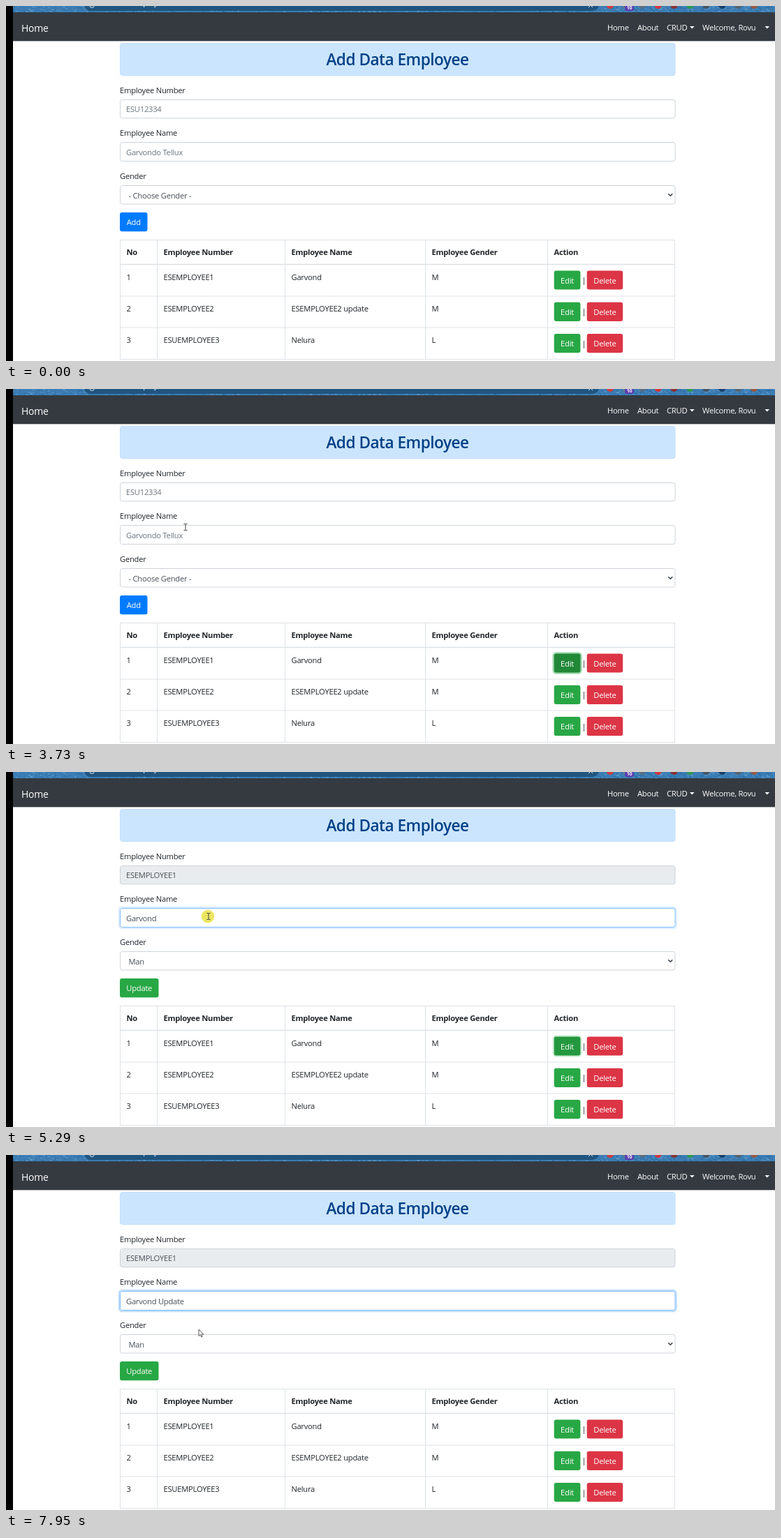
An HTML page that plays this animation: 1101x509 px, repeating every 8 s.

```html
<!DOCTYPE html>
<html lang="en">
<head>
<meta charset="utf-8">
<title>Add Data Employee</title>
<style>
  html, body { margin: 0; width: 100%; height: 100%; overflow: hidden; background: #fff; }
  svg { display: block; }
  text { font: 11.2px "Open Sans", "Noto Sans", sans-serif; letter-spacing: -.022em; fill: #212529; }
  .bold { font-weight: 700; }
  .white { fill: #fff; }
  .mid { text-anchor: middle; }
  .brand { font-size: 14px; }
  .title { font-size: 22.6px; font-weight: 600; fill: #004085; }
  .hint { font-size: 9px; font-weight: 600; fill: #fff; }
</style>
</head>
<body>
<svg id="stage" width="1101" height="509"></svg>
<script>
const LOOP = 8000;
const GREEN = '#28a745', BORDER = '#ced4da', LINE = '#dee2e6';
const NAME = 'Garvond', FULL_NAME = 'Garvondo Tellux';

let layer = document.getElementById('stage');

function add(tag, attrs, content = '') {
  const el = document.createElementNS('http://www.w3.org/2000/svg', tag);
  for (const key in attrs) el.setAttribute(key, attrs[key]);
  el.textContent = content;
  layer.append(el);
  return el;
}
const rect = (x, y, width, height, fill, more) => add('rect', { x, y, width, height, fill, ...more });
const text = (x, y, content, cls = '') => add('text', { x, y, class: cls }, content);
const path = (d, more) => add('path', { d, fill: 'none', ...more });
const box = (x, y, w, h, fill, stroke = BORDER) =>
  rect(x + .5, y + .5, w - 1, h - 1, fill, { rx: 3, stroke });
const ring = (x, y, w, h, stroke) =>
  rect(x - 1.1, y - 1.1, w + 2.2, h + 2.2, 'none', { rx: 4, stroke, 'stroke-width': 2.3 });

function group(draw) {
  const parent = layer, g = add('g', {});
  layer = g;
  draw();
  layer = parent;
  return g;
}
function button(x, y, w, label, fill) {
  rect(x, y, w, 27.2, fill, { rx: 3 });
  text(x + w / 2, y + 18.2, label, 'white mid');
}
const show = (el, on) => el.setAttribute('visibility', on ? 'visible' : 'hidden');
const fade = (el, amount) => el.setAttribute('opacity', amount);

// Browser strip with a denim theme
rect(10, 0, 1091, 9.5, '#3b7db4');
let seed = 7;
const random = () => (seed = seed * 16807 % 2147483647) / 2147483647;
for (const [color, count] of [['#1f5f97', 420], ['#7fb2d8', 380]]) {
  let d = '';
  for (let i = 0; i < count; i++)
    d += `M${(10 + random() * 1088).toFixed(1)},${(random() * 9).toFixed(1)}l${(1 + random() * 3).toFixed(1)},${(random() * 4 - 1).toFixed(1)}`;
  path(d, { stroke: color, 'stroke-width': .8, opacity: .75 });
}
rect(112, -12, 737, 19, '#205580', { rx: 9 });
text(180, -1, 'employee', 'white');
add('circle', { cx: 123, cy: -1, r: 3.4, fill: 'none', stroke: '#dce8f2' });
path('M834,2l3,-3l3,3', { stroke: '#dce8f2' });
['#d23c3c', '#6b7680', '#5a6d80', '#d8353c', '#8c3030', '#2e9a4c', '#47525c', '#17406a', '#58626c', '#9a5a40']
  .forEach((fill, i) => add('circle', { cx: 865 + i * 22.9, cy: -1, r: 5, fill }));
rect(886, -4, 13, 11, '#5b3fb0', { rx: 2 });
add('text', { x: 892.5, y: 5, class: 'white mid bold', style: 'font-size:7px' }, '10');

// Navigation bar
rect(10, 9, 1091, 41.3, '#343a40');
rect(0, 0, 10, 509, '#000');
text(22, 36.5, 'Home', 'white brand');
text(861, 35, 'Home', 'white');
text(904, 35, 'About', 'white');
text(946, 35, 'CRUD', 'white');
text(997, 35, 'Welcome, Rovu', 'white');
for (const x of [979, 1086.5]) path(`M${x},29h6.6l-3.3,3.4z`, { style: 'fill:#fff' });

// Form
box(163, 53, 795.5, 47, '#cce5ff', '#c0deff');
text(560.5, 85, 'Add Data Employee', 'title mid');
text(163, 124.5, 'Employee Number');
text(163, 186, 'Employee Name');
text(163, 248, 'Gender');
const numberBox = box(163, 134, 795.5, 27.3, '#fff');
const nameBox = box(163, 195, 795.5, 28, '#fff');
const nameRing = ring(163, 195, 795.5, 28, 'rgba(0,123,255,.25)');
box(163, 257, 795.5, 27.5, '#fff');
path('M948.2,269.2l3,3l3,-3', { stroke: '#343a40', 'stroke-width': 1.5 });
const numberText = text(172, 152.3, '');
const nameText = text(172, 214, '');
const genderText = text(175.5, 275.7, '');
const caret = rect(0, 203, 1, 13, '#333');
const addButton = group(() => button(163, 296, 39.5, 'Add', '#007bff'));
const updateButton = group(() => button(163, 296, 55.5, 'Update', GREEN));

// Table
const columns = [163.5, 216.5, 399.5, 600.5, 775.5, 957.5];
path(columns.map(x => `M${x},335V506.5`).join('') + 'M163,335.5H958M163,416H958M163,461H958M163,506.5H958', { stroke: LINE });
path('M163,370.5H958', { stroke: LINE, 'stroke-width': 1.6 });
['No', 'Employee Number', 'Employee Name', 'Employee Gender', 'Action']
  .forEach((head, i) => text(columns[i] + 9, 357, head, 'bold'));

let editHover, editRing;
[
  ['1', 'ESEMPLOYEE1', NAME, 'M'],
  ['2', 'ESEMPLOYEE2', 'ESEMPLOYEE2 update', 'M'],
  ['3', 'ESUEMPLOYEE3', 'Nelura', 'L']
].forEach((row, i) => {
  const y = 379.4 + i * 45.3;
  row.forEach((cell, c) => text(columns[c] + 9, y + 13.4, cell));
  button(784.7, y, 37.7, 'Edit', GREEN);
  if (!i) {
    editHover = group(() => button(784.7, y, 37.7, 'Edit', '#218838'));
    editRing = ring(784.7, y, 37.7, 27.2, 'rgba(72,180,97,.5)');
  }
  text(827.3, y + 17.5, '|', 'mid');
  button(831.7, y, 51.5, 'Delete', '#dc3545');
});

// Autofill list
const hints = group(() => {
  rect(162.5, 223, 139.5, 64.5, 'rgba(0,0,0,.22)', { rx: 4 });
  rect(163, 222, 138, 64, '#292a2d', { rx: 3 });
  text(171, 244, FULL_NAME, 'hint');
  text(171, 270, NAME.toLowerCase(), 'hint');
});

// Pointer shapes, each with its hot spot at 0,0
const clickSpot = add('circle', { r: 9.3, fill: 'rgba(225,215,0,.62)' });
const pointers = {
  arrow: path('M0,0V9.6L2.2,7.6L3.7,11L5.2,10.4L3.7,7.1H6.6Z', { style: 'fill:#fff', stroke: '#333', 'stroke-width': .8 }),
  beam: path('M-2.5,-4.5H-.6L0,-4L.6,-4.5H2.5M0,-4V4M-2.5,4.5H-.6L0,4L.6,4.5H2.5', { stroke: '#444', 'stroke-width': 1 }),
  hand: path('M-1,0Q0,-1.2 1,0V4L5,5.2Q6,5.6 5.8,7L5,11.8H-.3L-3,7.6Q-2.6,6.4 -1,7.4Z', { style: 'fill:#fff', stroke: '#444', 'stroke-width': .5 })
};

// Pointer track: time, x, y
const track = [
  [70, 416, 269], [300, 690, 400], [470, 954, 463], [810, 806, 401], [890, 805, 388],
  [2025, 805, 388], [2260, 470, 270], [2500, 257, 198],
  [3730, 257, 198], [4010, 560, 340], [4260, 772, 443], [4520, 803, 425],
  [4600, 620, 350], [4680, 480, 300], [4750, 367, 269], [4830, 303, 262],
  [4905, 303, 262], [5210, 290, 207], [7655, 290, 207], [7950, 276, 250], [LOOP, 276, 250]
];
const STEP = 74;

function pointerAt(t) {
  const i = Math.max(0, track.findIndex(key => key[0] > t) - 1);
  const [t0, x0, y0] = track[i], [t1, x1, y1] = track[i + 1];
  const p = Math.max(0, Math.floor((t - t0) / STEP) * STEP / (t1 - t0));
  return [x0 + (x1 - x0) * p, y0 + (y1 - y0) * p];
}

const between = (t, from, to) => t >= from && t < to;
const ramp = (t, start) => Math.min(1, Math.max(0, (t - start) / 150));
const keyTimes = [6420, 6580, 6900, 6970, 7150, 7220];

function render(t) {
  const filled = t >= 3810, focused = t >= 5210;
  const typed = keyTimes.filter(time => t >= time).length;
  const color = filled ? '#495057' : '#6c757d';

  numberBox.setAttribute('fill', filled ? '#e9ecef' : '#fff');
  numberText.textContent = filled ? 'ESEMPLOYEE1' : 'ESU12334';
  nameText.textContent = !filled ? FULL_NAME : typed ? `${NAME} ${'Update'.slice(0, typed)}` : NAME;
  genderText.textContent = filled ? 'Man' : '- Choose Gender -';
  numberText.style.fill = nameText.style.fill = color;
  genderText.style.fill = '#495057';
  show(addButton, !filled);
  show(updateButton, filled);

  const blur = 1 - ramp(t, 5210);
  fade(editHover, ramp(t, 890) * blur);
  fade(editRing, ramp(t, 1770) * blur);
  fade(nameRing, ramp(t, 5210));
  nameBox.setAttribute('stroke', focused ? '#80bdff' : BORDER);
  show(hints, between(t, 5440, 5850));
  show(caret, between(t, 5360, 5850) || between(t, 6420, 7730));
  caret.setAttribute('x', 172 + nameText.getComputedTextLength());

  const [x, y] = pointerAt(t);
  const inField = x > 163 && x < 958 && (between(y, 134, 161) || between(y, 195, 223));
  const onEdit = between(x, 785, 822) && between(y, 380, 407);
  const shape = inField ? 'beam' : onEdit ? 'hand' : 'arrow';
  for (const name in pointers) {
    show(pointers[name], t >= 70 && name === shape);
    pointers[name].setAttribute('transform', `translate(${x} ${y})`);
  }
  clickSpot.setAttribute('transform', `translate(${x - 1} ${y})`);
  show(clickSpot, between(t, 1770, 1920) || between(t, 5210, 5360));
}

function tick() {
  render(performance.now() % LOOP);
  requestAnimationFrame(tick);
}
tick();
</script>
</body>
</html>
```
